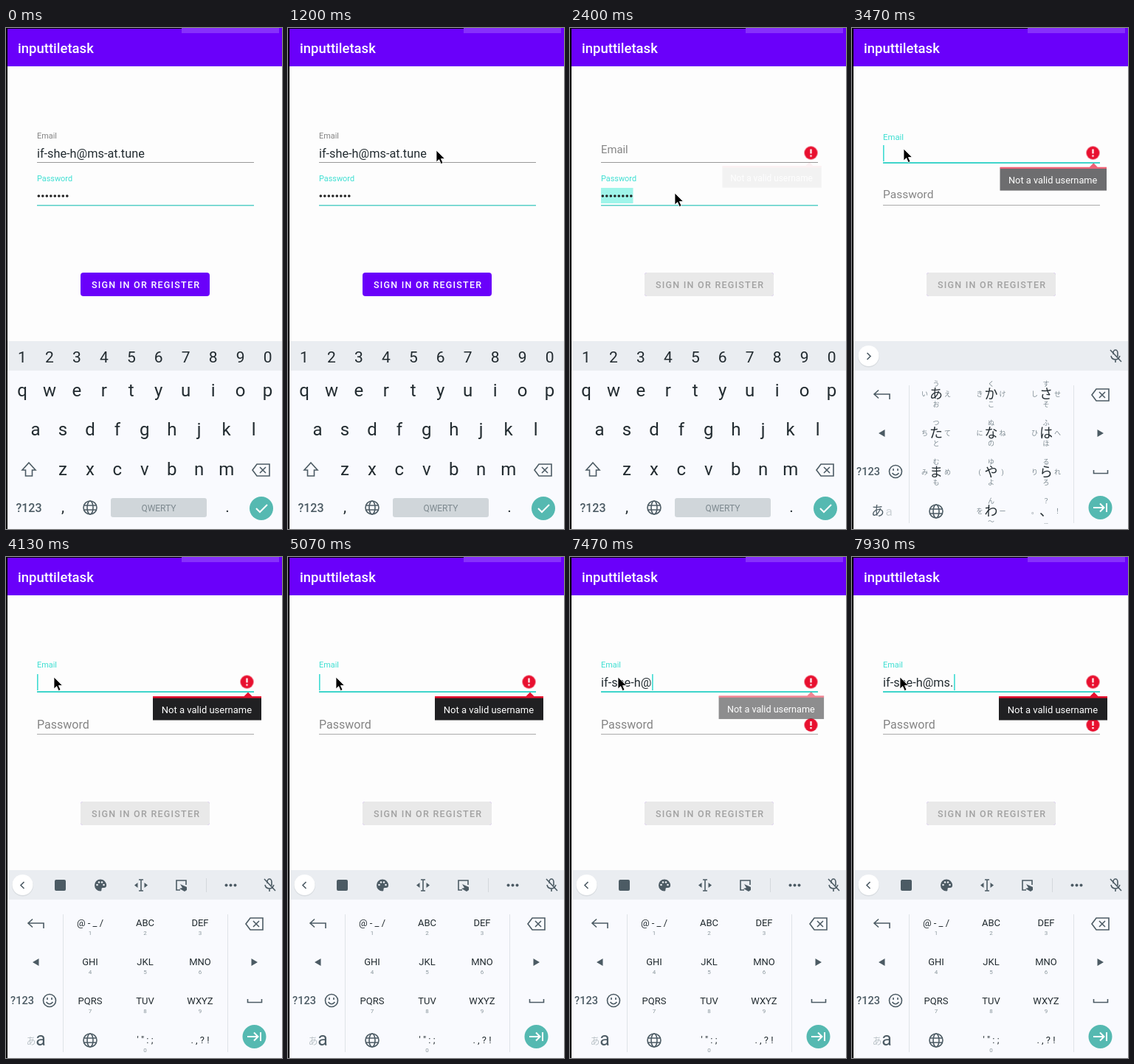
An HTML page for the animation above (8000 ms loop, 374x680 px).

```html
<!DOCTYPE html>
<html lang="en">
<head>
<meta charset="utf-8">
<title>Sign-in form</title>
<style>
  html, body { margin: 0; width: 100%; height: 100%; overflow: hidden; background: #fdfdfd; }
  svg { display: block; }
  text { font-family: Roboto, "Noto Sans CJK JP", "Noto Sans CJK", sans-serif; fill: #222b30; white-space: pre; }
  .mid text, text.mid { text-anchor: middle; }
  .value { font-size: 16.3px; }
  .label { font-size: 16px; }
  .btn { font-size: 12.5px; font-weight: 500; letter-spacing: 1.25px; }
  .icon { fill: none; stroke: #4c5b64; stroke-width: 1.6; }
  .solid { fill: #4c5b64; }
  .mode { font-weight: 500; fill: #4c5b64 !important; }
  .small { font-size: 9px; fill: #7d8a91; }
  .digit { font-size: 8px; fill: #8b979d; }
  .kana { font-size: 18px; }
  .abc { font-size: 13px; }
  .tip { fill: none; stroke: #fff; stroke-width: 2; }
  #popup { transform-origin: 284px 165px; }
</style>
</head>
<body>
<svg width="374" height="680" viewBox="0 0 374 680">
  <defs>
    <g id="erase" class="icon">
      <path d="M-12 0L-6-8H11V8H-6Z"/><path d="M-2-4L6 4M6-4L-2 4"/>
    </g>
    <g id="globe" class="icon">
      <circle r="9"/><ellipse rx="4" ry="9"/><path d="M-8.5-3H8.5M-8.5 3H8.5"/>
    </g>
    <g id="alert">
      <circle r="9" fill="#e8102f"/><path d="M0-5V1M0 3V5.2" stroke="#fff" stroke-width="2.2"/>
    </g>
  </defs>

  <rect width="374" height="680" fill="#fdfdfd"/>
  <rect width="374" height="52" fill="#6a00fa"/>
  <rect x="238" width="132" height="7" fill="#8630fb"/>
  <rect width="238" height="1"/>
  <text x="16" y="34" font-size="18.5" font-weight="500" style="fill:#fff">inputtiletask</text>

  <!-- email -->
  <rect id="mailPick" x="42" y="159" width="146" height="21" fill="#9ff5ea"/>
  <text id="mail" class="value" x="42" y="176">if-she-h@ms-at.tune</text>
  <text id="typed" class="value" x="42" y="176"></text>
  <text id="mailLabel" class="label">Email</text>
  <path d="M42 182.5H336" stroke="#999"/>
  <path id="mailLine" d="M42 183H336" stroke="#3fd5ca" stroke-width="2"/>
  <rect id="mailCaret" x="42" y="159" width="1.6" height="22" fill="#3fdcd2"/>
  <use id="mailAlert" href="#alert" x="326.5" y="169.5"/>

  <!-- password -->
  <rect id="passPick" x="42" y="217" width="43.5" height="21" fill="#9ff5ea"/>
  <g id="dots"></g>
  <text id="passLabel" class="label">Password</text>
  <path d="M42 240.5H336" stroke="#aaa"/>
  <path id="passLine" d="M42 240.8H336" stroke="#58cfc8" stroke-width="1.6"/>
  <rect id="passCaret" x="42" y="218" width="1.6" height="20" fill="#3fdcd2"/>
  <use id="passAlert" href="#alert" x="326.5" y="228"/>

  <!-- button -->
  <rect x="101" y="332" width="175" height="32" rx="4" fill="#6a00fa"/>
  <text class="btn" x="116" y="353" style="fill:#fff">SIGN IN OR REGISTER</text>
  <g id="disabled">
    <rect x="101" y="332" width="175" height="32" rx="3" fill="#e9e9e9"/>
    <text class="btn" x="116" y="353" style="fill:#a2a2a2">SIGN IN OR REGISTER</text>
  </g>

  <g id="popup">
    <rect x="199" y="190" width="147" height="31.5" fill="#202022"/>
    <path d="M199 189H322.5L328 183.5L333.5 189H346V191.5H199Z" fill="#e8102f"/>
    <text class="mid" x="272" y="212" font-size="13" style="fill:#fff">Not a valid username</text>
  </g>

  <!-- keyboards -->
  <rect y="425" width="374" height="255" fill="#f9fafe"/>
  <rect y="425" width="374" height="40" fill="#eaedf1"/>

  <g id="latin" class="mid">
    <path class="icon" d="M31 590L40 600H35.5V608H26.5V600H22Z"/>
    <use href="#erase" x="346" y="600"/>
    <text class="mode" x="31" y="657" font-size="16">?123</text>
    <text x="77" y="657" font-size="21">,</text>
    <use href="#globe" x="114" y="651"/>
    <rect x="142" y="638" width="130" height="26" rx="3" fill="#d0d6da"/>
    <text x="207" y="656" font-size="12" style="fill:#7d898f">QWERTY</text>
    <text x="300" y="657" font-size="21">.</text>
    <circle cx="346" cy="652" r="16" fill="#55b9b1"/>
    <path class="tip" d="M339 652L344 657L354 647"/>
  </g>

  <g id="flick">
    <path d="M77.5 485V672M300.5 485V672" stroke="#dfe3e8"/>
    <path class="icon" d="M51 504V497H31M36 491.5L30 497L36 502.5"/>
    <use href="#erase" x="337" y="498"/>
    <path class="solid" d="M44.5 545V555L36 550ZM332.5 545V555L341 550Z"/>
    <text class="mid mode" x="22" y="607" font-size="14.5">?123</text>
    <g class="icon" transform="translate(59 602)">
      <circle r="8.5"/><path d="M-4.5 2Q0 7.5 4.5 2M-3-4V-1M3-4V-1"/>
    </g>
    <path class="icon" d="M327.5 600V604.5H346.5V600"/>
    <use href="#globe" x="114" y="656"/>
    <circle cx="336.5" cy="651" r="16" fill="#55b9b1"/>
    <path class="tip" d="M327 651H341M336 645.5L341.5 651L336 656.5M345 645V657"/>

    <g id="kana" class="mid">
      <text class="mode" x="35" y="662" font-size="18">あ</text>
      <text x="50" y="662" font-size="17" style="fill:#ccd2d6">a</text>
    </g>
    <g id="abc" class="mid">
      <text x="34" y="661" font-size="13" style="fill:#bcc4c9">あ</text>
      <text x="47" y="663" font-size="25" style="fill:#4c5b64">a</text>
    </g>

    <circle cx="22.5" cy="446" r="14.5" fill="#d9dde1"/>
    <circle cx="22.5" cy="445" r="14" fill="#fff"/>
    <g class="icon" transform="translate(357 445)">
      <path d="M-3-2V-4A3 4 0 0 1 3-4V1M-6 0Q-5 5 0 5Q4 5 6 0M0 5V9M-7-8L8 8"/>
    </g>
    <path id="more" class="icon" d="M20.5 441L25 445.5L20.5 450"/>
    <g id="tools">
      <path class="icon" d="M24.5 441L20 445.5L24.5 450"/>
      <rect class="solid" x="66" y="438" width="15" height="15" rx="2"/>
      <path class="solid" d="M128 437.5A8 8 0 1 0 128 453.5C131 453.5 128 449 131 449H133C139 449 136 437.5 128 437.5Z"/>
      <g fill="#eaedf1">
        <circle cx="123.5" cy="445" r="1.3"/><circle cx="126" cy="441.5" r="1.3"/>
        <circle cx="130" cy="441.5" r="1.3"/><circle cx="132.5" cy="445" r="1.3"/>
      </g>
      <path class="icon" d="M180 438H186M183 438V453M180 453H186"/>
      <path class="solid" d="M178.5 442V449L174 445.5ZM187.5 442V449L192 445.5Z"/>
      <path class="icon" d="M236 452H231V439H244V445"/>
      <path class="solid" d="M236 444L245 448V452L242 454L235 450L239 449Z"/>
      <path d="M271.5 436V455" stroke="#d3d8dc"/>
      <g class="solid">
        <circle cx="298.5" cy="445.5" r="2"/><circle cx="304.5" cy="445.5" r="2"/><circle cx="310.5" cy="445.5" r="2"/>
      </g>
    </g>
  </g>

  <rect width="2" height="680"/>
  <path id="pointer" d="M0 0V16L3.7 12.5L6.3 18.5L9 17.3L6.4 11.5H11.5Z" stroke="#fff" stroke-width=".8"/>
</svg>

<script>
const LOOP = 8000;
const $ = id => document.getElementById(id);

function add(parent, tag, attrs, text = '') {
  const el = document.createElementNS('http://www.w3.org/2000/svg', tag);
  for (const name in attrs) el.setAttribute(name, attrs[name]);
  el.textContent = text;
  return parent.appendChild(el);
}

// Stops are [ms, value, easing]; a stop without easing holds its value.
function anim(el, prop, stops) {
  const frames = [...stops, [LOOP, stops.at(-1)[1]]].map(
    ([t, value, easing = 'step-end']) => ({ offset: t / LOOP, [prop]: value, easing }));
  el.animate(frames, { duration: LOOP, iterations: Infinity });
}

// Alternating on and off times.
function show(el, ...times) {
  const stops = times[0] ? [[0, 0]] : [];
  times.forEach((t, i) => stops.push([t, 1 - i % 2]));
  anim(el, 'opacity', stops);
}

const keyRow = (chars, x, y, size) =>
  [...chars].forEach((c, i) => add($('latin'), 'text', { x: x + i * 36.95, y, 'font-size': size }, c));
keyRow('1234567890', 22, 454, 21);
keyRow('qwertyuiop', 22, 500, 24);
keyRow('asdfghjkl', 40, 553, 24);
keyRow('zxcvbnm', 77, 607, 24);

for (let i = 0; i < 8; i++) add($('dots'), 'circle', { cx: 44.3 + i * 5.5, cy: 228, r: 1.8, fill: '#222' });

// Each key: centre, then left, up, right, down.
const kana = 'あいうえお かきくけこ さしすせそ たちつてと なにぬねの はひふへほ まみむめも や(ゆ)よ らりるれろ _ わをんー～ 、。？！…';
const abc = ['@ - _ /', 'ABC', 'DEF', 'GHI', 'JKL', 'MNO', 'PQRS', 'TUV', 'WXYZ', '', '\' " : ;', '. , ? !'];
const around = [[0, 0], [-15.5, 0], [0, -14], [15.5, 0], [0, 14]];
kana.split(' ').forEach((key, i) => {
  const x = 114 + i % 3 * 74.5, y = 496 + Math.floor(i / 3) * 53;
  if (key === '_') return;
  [...key].forEach((c, k) => add($('kana'), 'text', {
    x: x + around[k][0], y: y + around[k][1] + (k ? 3.5 : 7), class: k ? 'small' : 'kana'
  }, c));
  add($('abc'), 'text', { x, y: y + 5, class: 'abc' }, abc[i]);
  if (i < 11) add($('abc'), 'text', { x, y: y + 17, class: 'digit' }, i === 10 ? '0' : i + 1);
});

// Focus, contents and errors
show($('mail'), 0, 1870);
show($('mailPick'), 1530, 1870);
show($('mailLine'), 1270, 2270, 3340);
show($('mailAlert'), 1870, 5800, 7330);
show($('dots'), 0, 2470);
show($('passPick'), 2340, 2470);
show($('passLine'), 0, 1270, 2270, 3340);
show($('passCaret'), 2470, 2870);
show($('passAlert'), 5800);
show($('disabled'), 1870);

const teal = '#3fdfd2', grey = '#858585';
anim($('mailLabel'), 'fill', [[0, grey], [1270, teal], [2270, grey], [3340, teal]]);
anim($('passLabel'), 'fill', [[0, teal], [1270, grey], [2270, teal], [3340, grey]]);
const raised = y => `translate(42px, ${y}px) scale(.68)`;
const resting = y => `translate(42px, ${y}px) scale(1)`;
anim($('mailLabel'), 'transform', [
  [0, raised(150)], [2270, raised(150), 'linear'], [2440, resting(175.5)],
  [3340, resting(175.5), 'linear'], [3485, raised(150)]]);
anim($('passLabel'), 'transform', [
  [0, raised(208)], [3340, raised(208), 'linear'], [3485, resting(233)]]);

anim($('popup'), 'opacity', [
  [0, 0], [1870, 0, 'linear'], [2020, 1], [2270, 1, 'linear'], [2408, 0],
  [3380, 0, 'linear'], [3520, 1], [5800, 1, 'linear'], [5940, 0],
  [7400, 0, 'linear'], [7540, 1]]);
const tiny = 'scale(.91)', full = 'scale(1)';
anim($('popup'), 'transform', [
  [0, tiny], [1870, tiny, 'ease-out'], [2020, full], [2270, full, 'linear'], [2408, tiny],
  [3380, tiny, 'ease-out'], [3520, full], [5800, full, 'linear'], [5940, tiny],
  [7400, tiny, 'ease-out'], [7540, full]]);

// The email keyboard opens in kana, then settles on letters.
show($('latin'), 0, 1400, 2300, 3400);
show($('flick'), 1400, 2300, 3400);
show($('kana'), 1400, 1600, 3400, 3600);
show($('abc'), 1600, 2300, 3600);
show($('more'), 1400, 1600, 3400, 3600);
show($('tools'), 1600, 2300, 3600);

// Typing
const keyTimes = [5800, 5930, 6130, 6270, 6470, 6670, 7270, 7270, 7330, 7530, 7670, 7930];
const typed = $('typed');
const chars = [...'if-she-h@ms.'].map(c => add(typed, 'tspan', {}, c));
const caretStops = [[0, 'translateX(0px)']];
chars.forEach((el, i) => {
  const t = keyTimes[i];
  anim(el, 'fillOpacity', [[0, 0], [t, 1]]);
  caretStops.push([t, `translateX(${typed.getSubStringLength(0, i + 1) + 0.8}px)`]);
});
anim($('mailCaret'), 'transform', caretStops);
show($('mailCaret'), 3340, 3840, 3930, 4430, 4930, 5430, 5800);

// Pointer
const at = (x, y) => `translate(${x}px, ${y}px)`;
anim($('pointer'), 'transform', [
  [0, at(385, 300), 'ease-out'], [870, at(201, 166)],
  [1930, at(201, 166), 'ease-in-out'], [2200, at(142, 224)],
  [3070, at(142, 224), 'ease-in-out'], [3300, at(70, 164)],
  [3530, at(70, 164), 'ease-in-out'], [3870, at(65, 163)]]);
</script>
</body>
</html>
```
